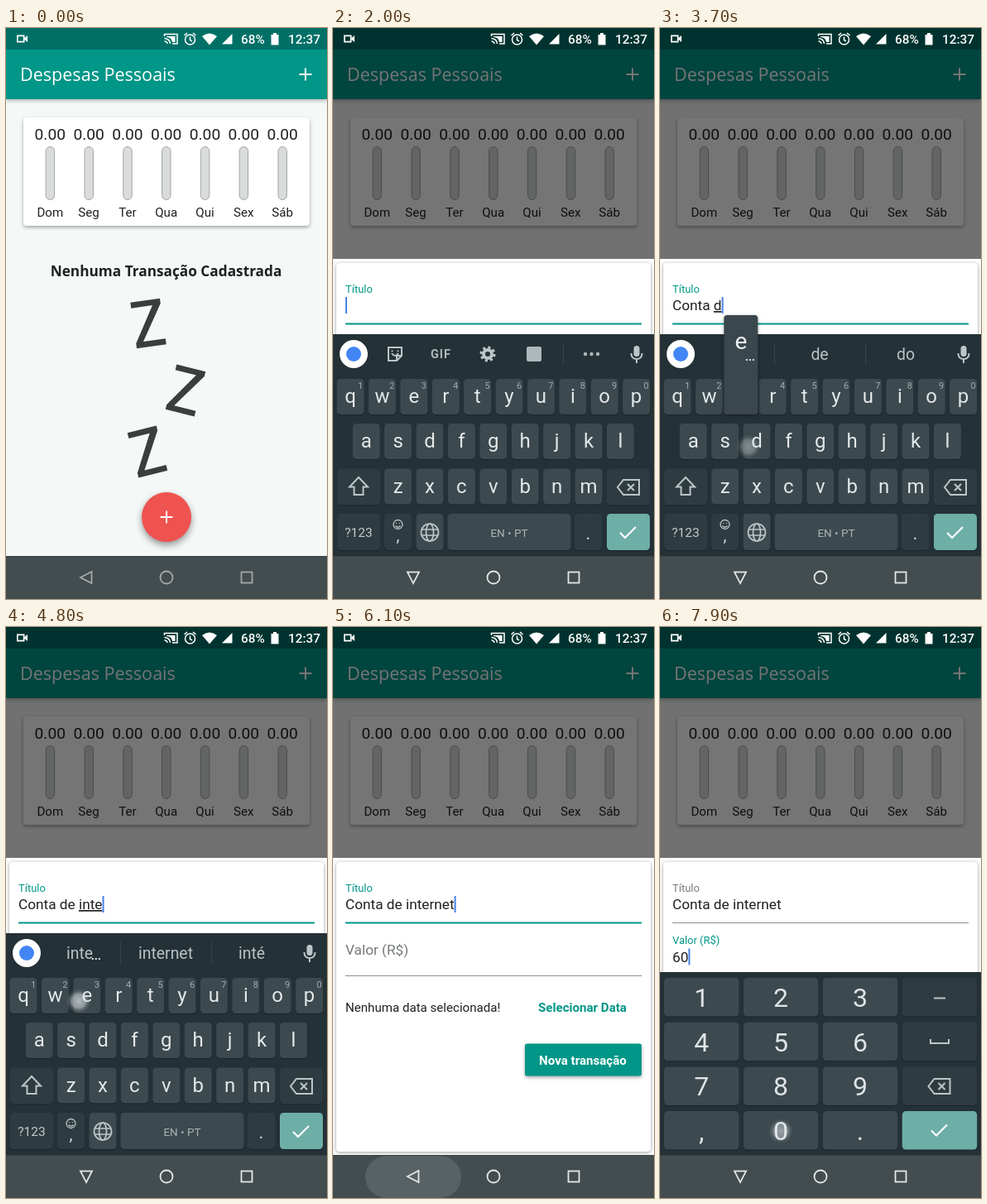
An HTML page that plays this animation: 388 px wide and 690 px high, repeating every 8000 ms.

```html
<!DOCTYPE html>
<html lang="pt-BR">
<head>
<meta charset="utf-8">
<title>Despesas Pessoais</title>
<style>
html, body { margin: 0; width: 100%; height: 100%; overflow: hidden; background: #f4f8f6; }
svg { display: block; width: 100%; height: 100%; }
text { font-family: Roboto, sans-serif; white-space: pre; }
.open { font-family: "Open Sans", sans-serif; }
.mid { text-anchor: middle; }
.bold { font-weight: 700; }
.lift { filter: drop-shadow(0 2px 2px #0005); }
.line { fill: none; stroke-width: 2; stroke: #bcc6c9; }

#scrim, #sheet, #titleLabel, #valueLabel, #titleBar, #valueBar, #letters, #digits, #back, #navGlow, #fabGlow {
  animation: 8s linear infinite;
}
#scrim { animation-name: dim; }
#sheet { animation-name: rise; }
#titleLabel { animation-name: titleFloat; }
#valueLabel { animation-name: valueFloat; }
#titleBar { animation-name: titleFocus; }
#valueBar { animation-name: valueFocus; }
#letters { animation-name: letters; }
#digits { animation-name: digits; }
#back { animation-name: back; transform-origin: 97px 664px; }
#navGlow { animation-name: navGlow; transform-origin: 97px 664px; }
#fabGlow { animation-name: fabGlow; transform-origin: 194px 591px; }

@keyframes dim { 0%, 9.81% { opacity: 0 } 12.94%, 100% { opacity: .54 } }
@keyframes rise {
  0% { transform: translateY(362px) }
  9.81% { transform: translateY(362px); animation-timing-function: cubic-bezier(0, 0, .2, 1) }
  12.94%, 100% { transform: none }
}
@keyframes titleFloat {
  0%, 17.5% { transform: translate(15px, 331px) scale(1); fill: #757b79 }
  20%, 83.75% { transform: translate(15px, 319.5px) scale(.75); fill: #009688 }
  86.25%, 100% { transform: translate(15px, 319.5px) scale(.75); fill: #757b79 }
}
@keyframes valueFloat {
  0%, 83.75% { transform: translate(15px, 395.5px) scale(1); fill: #757b79 }
  86.25%, 100% { transform: translate(15px, 383px) scale(.75); fill: #009688 }
}
@keyframes titleFocus { 0%, 17.5% { opacity: 0 } 20%, 83.75% { opacity: 1 } 86.25%, 100% { opacity: 0 } }
@keyframes valueFocus { 0%, 83.75% { opacity: 0 } 86.25%, 100% { opacity: 1 } }
@keyframes letters {
  0% { transform: translateY(272px) }
  20.63% { transform: translateY(272px); animation-timing-function: cubic-bezier(0, 0, .2, 1) }
  23.75% { transform: none }
  73.5% { transform: none; animation-timing-function: cubic-bezier(.4, 0, 1, 1) }
  76%, 100% { transform: translateY(272px) }
}
@keyframes digits {
  0% { transform: translateY(225px) }
  85% { transform: translateY(225px); animation-timing-function: cubic-bezier(0, 0, .2, 1) }
  88.13%, 100% { transform: none }
}
@keyframes back {
  0%, 20.63% { transform: rotate(0deg) }
  23.13%, 73.5% { transform: rotate(-90deg) }
  75.5%, 85% { transform: rotate(0deg) }
  87.5%, 100% { transform: rotate(-90deg) }
}
@keyframes navGlow {
  0%, 72.5% { opacity: 0; transform: scaleX(.3) }
  74.5%, 76.9% { opacity: 1; transform: none }
  79.4%, 100% { opacity: 0; transform: none }
}
@keyframes fabGlow {
  0%, 5% { opacity: 0; transform: scale(.3) }
  8% { opacity: .25; transform: none }
  11%, 100% { opacity: 0; transform: none }
}
</style>
</head>
<body>
<svg viewBox="0 0 388 690">
  <defs>
    <radialGradient id="glow">
      <stop offset="0" stop-color="#fff" stop-opacity=".8"/>
      <stop offset=".55" stop-color="#e4eaec" stop-opacity=".65"/>
      <stop offset=".75" stop-color="#dfe6e8" stop-opacity=".22"/>
      <stop offset="1" stop-color="#dfe6e8" stop-opacity="0"/>
    </radialGradient>
    <path id="zed" fill="#3b3e3d" d="M-18-28H18V-22L-9 21H18V28H-18V22L8-21H-18Z"/>
    <path id="erase" class="line" d="M-6-9H13V9H-6L-13 0ZM-1-4 7 4M7-4-1 4"/>
    <path id="tick" d="M-10 0-4 6 9-7" fill="none" stroke="#fff" stroke-width="2.2"/>
  </defs>

  <rect width="388" height="690" fill="#f4f8f6"/>
  <rect y="20" width="388" height="66" fill="#009688" style="filter:drop-shadow(0 2px 2px #0004)"/>
  <rect width="388" height="26" fill="#007066"/>
  <text class="open" x="17" y="64" font-size="21.56" fill="#fff">Despesas Pessoais</text>
  <path d="M354.5 56H369.5M362 48.500V63.500" stroke="#fff" stroke-width="2"/>
  <rect class="lift" x="21" y="108" width="346" height="131" rx="4" fill="#fff"/>
  <g id="week"></g>
  <text class="open bold mid" x="193.500" y="300" font-size="17.24" fill="#1e2120">Nenhuma Transação Cadastrada</text>
  <use href="#zed" transform="translate(172 357) rotate(-8)"/>
  <use href="#zed" transform="translate(217 438) rotate(14)"/>
  <use href="#zed" transform="translate(171 512) rotate(-14)"/>
  <circle cx="194" cy="591" r="30" fill="#ef5350" style="filter:drop-shadow(0 4px 4px #0006)"/>
  <circle id="fabGlow" cx="194" cy="591" r="30" fill="#fff"/>
  <path d="M186.500 591H201.500M194 583.500V598.500" stroke="#fff" stroke-width="2"/>

  <rect id="scrim" width="388" height="690"/>

  <g id="sheet">
    <rect y="279" width="388" height="420" fill="#fdfefd"/>
    <rect x="4" y="284" width="380" height="350" rx="4" fill="#fff" style="filter:drop-shadow(0 1px 2px #0006)"/>
    <text id="titleLabel" font-size="17.24">Título</text>
    <rect x="15" y="357" width="358" height="1" fill="#8a8f8d"/>
    <rect id="titleBar" x="15" y="356.500" width="358" height="2" fill="#009688"/>
    <text id="valueLabel" font-size="17.24">Valor (R$)</text>
    <rect x="15" y="421" width="358" height="1" fill="#8a8f8d"/>
    <rect id="valueBar" x="15" y="420.500" width="358" height="2" fill="#009688"/>
    <text id="titleText" x="15" y="341" font-size="17.24" fill="#1e2120"><tspan></tspan><tspan text-decoration="underline"></tspan></text>
    <text id="valueText" x="15" y="404.500" font-size="17.24" fill="#1e2120"></text>
    <rect id="caret" width="2" height="20" fill="#4a80e8"/>
    <text x="15" y="465" font-size="15.1" fill="#1e2120">Nenhuma data selecionada!</text>
    <text class="bold mid" x="301.500" y="465" font-size="15.1" fill="#009688">Selecionar Data</text>
    <rect class="lift" x="232" y="503.500" width="141" height="39" rx="2.500" fill="#009688"/>
    <text class="bold mid" x="302" y="528.500" font-size="15.1" fill="#fff">Nova transação</text>
  </g>

  <g id="letters">
    <rect y="370" width="388" height="270" fill="#243136"/>
    <circle cx="25" cy="394" r="17" fill="#fff"/>
    <circle cx="25" cy="394" r="9" fill="#4285f4"/>
    <g id="tools" fill="#aeb8bb">
      <path class="line" d="M67 386H83V396L77 402H67ZM77 402V396H83"/>
      <path class="line" d="M71 393Q75 399 79 393M71.500 389.500V391M78.500 389.500V391" stroke-width="1.500"/>
      <text class="bold mid" x="130.500" y="399" font-size="14.500" letter-spacing="1">GIF</text>
      <circle class="line" cx="187" cy="394" r="5" stroke-width="4" style="stroke-width:4"/>
      <circle class="line" cx="187" cy="394" r="8" stroke-dasharray="3.140 3.140" style="stroke-width:3"/>
      <rect x="234" y="385" width="18" height="18" rx="2"/>
      <path d="M278.500 381V407" stroke="#38464c"/>
      <circle cx="305" cy="394" r="2.200"/><circle cx="312.500" cy="394" r="2.200"/><circle cx="320" cy="394" r="2.200"/>
    </g>
    <g id="hints" font-size="19.4" fill="#b9c2c5" class="mid">
      <path d="M138.500 381V407M248.500 381V407" stroke="#38464c"/>
      <text x="89" y="401"></text><text x="193" y="401"></text><text x="297" y="401"></text>
    </g>
    <rect x="363.500" y="384" width="7" height="13" rx="3.500" fill="#bcc6c9"/>
    <path class="line" d="M360.500 393V394Q361 400 367 400T373.500 394V393M367 400V405" stroke-width="1.600"/>
    <g id="letterKeys"></g>
    <path class="line" d="M31 543 42 554.500H36.500V564H25.500V554.500H20Z"/>
    <use href="#erase" x="357" y="555"/>
    <text class="mid" x="31" y="615" font-size="15.500" fill="#c3cbcd">?123</text>
    <circle class="line" cx="78.500" cy="600" r="5.500" style="stroke-width:1.300"/>
    <path class="line" d="M75.500 601.500Q78.500 605 81.500 601.500M76.500 598V599M80.500 598V599" style="stroke-width:1.300"/>
    <text class="mid" x="78.500" y="620" font-size="20" fill="#d5dbdd">,</text>
    <g class="line" style="stroke-width:1.700">
      <circle cx="117" cy="609.500" r="10.500"/><ellipse cx="117" cy="609.500" rx="4.500" ry="10.500"/>
      <path d="M107.500 606H126.500M107.500 613H126.500"/>
    </g>
    <text class="mid" x="213" y="614.500" font-size="13.500" fill="#aab4b7">EN • PT</text>
    <text class="mid" x="308.500" y="618" font-size="22" fill="#d5dbdd">.</text>
    <use href="#tick" x="357" y="610"/>
  </g>
  <g id="popup">
    <rect x="-20.500" y="-77" width="41" height="120" rx="4" fill="#3a474d" style="filter:drop-shadow(0 1px 2px #0005)"/>
    <text class="mid" y="-36" font-size="28" fill="#eef1f2"></text>
    <path d="M6-23H16" stroke="#dfe4e6" stroke-width="2" stroke-dasharray="2 2"/>
  </g>

  <g id="digits">
    <rect y="417" width="388" height="225" fill="#243136"/>
    <g id="digitKeys"></g>
    <path class="line" d="M331 448.500H345M327 498V503H349V498"/>
    <use href="#erase" x="337.500" y="555"/>
    <use href="#tick" x="338" y="608.500"/>
  </g>

  <rect y="638" width="388" height="52" fill="#434c4e"/>
  <rect y="638" width="388" height="1" fill="#394143"/>
  <rect id="navGlow" x="39" y="639" width="116" height="51" rx="25.500" fill="#586163"/>
  <g id="nav" fill="none" stroke-width="1.800">
    <path id="back" d="M90 664 103.500 657V671Z"/>
    <circle cx="194" cy="664" r="7.500"/>
    <rect x="284.500" y="657.500" width="13" height="13"/>
  </g>

  <g fill="#fff">
    <path d="M13 8.500H22.500V12L26 9V17L22.500 14V17.500H13ZM14.700 10.200V15.800H20.800V10.200Z" fill-rule="evenodd"/>
    <g fill="none" stroke="#fff" stroke-width="1.500">
      <path d="M191.500 10V7.500H207V19H201M191.500 12.500Q198 13 198.500 19M191.500 16Q194.500 16 195 19"/>
      <circle cx="222.500" cy="14" r="6"/><path d="M222.500 10.500V14.500L225 16M215.500 9 219 6.200M229.500 9 226 6.200"/>
    </g>
    <path d="M194 10H204.500V17H201Q200 11 194 11Z"/>
    <path d="M237 10Q246 3 255 10L246 20.500Z"/>
    <path d="M261 19.500 273.500 7V19.500Z"/>
    <path d="M320.500 8H323V6H327V8H329.500V20.500H320.500Z"/>
    <text x="284" y="18.500" font-size="15.300" font-weight="500">68%</text>
    <text x="341" y="18.500" font-size="15.400" font-weight="500">12:37</text>
  </g>
  <circle id="dot" r="15" fill="url(#glow)"/>
</svg>
<script>
const LOOP = 8000;
const $ = id => document.getElementById(id);

function add(parent, tag, attrs, text) {
  const node = document.createElementNS('http://www.w3.org/2000/svg', tag);
  for (const name in attrs) node.setAttribute(name, attrs[name]);
  if (text) node.textContent = text;
  parent.appendChild(node);
  return node;
}

'Dom Seg Ter Qua Qui Sex Sáb'.split(' ').forEach((day, i) => {
  const x = 53.3 + 46.8 * i, week = $('week');
  add(week, 'text', { class: 'mid', x, y: 134.5, 'font-size': 19.2, fill: '#1e2120' }, '0.00');
  add(week, 'rect', { x: x - 5.1, y: 143.5, width: 10.4, height: 64, rx: 5.2, fill: '#d9dcdb', stroke: '#a2a5a4' });
  add(week, 'text', { class: 'mid', x, y: 227.5, 'font-size': 15.1, fill: '#1e2120' }, day);
});

function cap(parent, x, y, width, height, fill) {
  add(parent, 'rect', { x, y: y + 1, width, height, rx: 4.5, fill: '#192428' });
  add(parent, 'rect', { x, y, width, height, rx: 4.5, fill });
}

// Letter keyboard
const PLAIN = '#3c494e', DARK = '#2e3b40', TEAL = '#6daea6';
const keys = {};
[['qwertyuiop', 21, 424], ['asdfghjkl', 40.2, 478], ['zxcvbnm', 78.6, 532.5]].forEach(([row, left, y], r) => {
  [...row].forEach((char, i) => {
    const x = left + 38.4 * i, box = $('letterKeys');
    cap(box, x - 16.5, y, 33, 43, PLAIN);
    const label = add(box, 'text', { class: 'mid', x, y: y + 29, 'font-size': 24, fill: '#e3e8e9' }, char);
    if (!r) add(box, 'text', { class: 'mid', x: x + 12, y: y + 12, 'font-size': 11, fill: '#a3adb0' }, String((i + 1) % 10));
    keys[char] = { x, y, label };
  });
});
[[5, 532.5, 52, DARK], [331, 532.5, 52, DARK], [5, 587, 52, DARK], [62, 587, 33, DARK], [100.5, 587, 33, PLAIN],
 [138.5, 587, 149, PLAIN], [292, 587, 33, DARK], [331, 587, 52, TEAL]]
  .forEach(([x, y, w, fill]) => cap($('letterKeys'), x, y, w, 44, fill));

// Number keyboard
[...'123-456 789<,0.!'].forEach((char, i) => {
  const col = i % 4, x = 5 + 95.9 * col, y = 424 + 53.7 * (i >> 2);
  cap($('digitKeys'), x, y, 90.5, 46.5, col < 3 ? PLAIN : i < 15 ? DARK : TEAL);
  if (col < 3) add($('digitKeys'), 'text', { class: 'mid', x: x + 45.2, y: y + 35, 'font-size': 32, fill: '#dfe4e6' }, char);
});

// Touches: x, y, down, up
const touches = [[194, 591, 420, 640], [130, 330, 1330, 1430], [31, 556, 2180, 2270],
  [97, 664, 5800, 5890], [150, 392, 6600, 6700], [242, 501, 7420, 7510], [146, 609, 7770, 7850]];

const downs = [2430, 2640, 2840, 3040, 3240, 3400, 3520, 3650, 3940, 4130, 4320, 4490, 4660, 4930, 5130, 5330, 5530];
const strokes = [...'Conta de internet'].map((char, i) => {
  const key = keys[char.toLowerCase()], down = downs[i], up = down + 110;
  touches.push(key ? [key.x - 10, key.y + 28, down, up] : [205, 612, down, up]);
  return { char, key, down, up };
});

const guesses = {
  C: 'C Com Como', Co: 'Co Com Como', Con: 'Con Conta Consegui', Cont: 'Cont Conta Contato',
  Conta: 'Conta Contas Contato', d: 'd de do', de: 'de dele dela', i: 'i isso ir', in: 'in início inteiro',
  int: 'int inteiro interior', inte: 'inte internet inté', inter: 'inter internet interior',
  intern: 'intern internet interno', interne: 'interne internet internei', internet: 'internet internets internett'
};

const [fixed, composing] = $('titleText').children;
const hintTexts = $('hints').querySelectorAll('text');
const show = (node, on) => { node.style.visibility = on ? 'visible' : 'hidden'; };
const setText = (node, text) => { if (node.textContent !== text) node.textContent = text; };

function render(t) {
  const typed = strokes.filter(s => s.up <= t).map(s => s.char).join('');
  const cut = t < 5850 ? typed.lastIndexOf(' ') + 1 : typed.length;
  const word = typed.slice(typed.lastIndexOf(' ') + 1);
  setText(fixed, typed.slice(0, cut));
  setText(composing, typed.slice(cut));
  const amount = t < 7510 ? '' : t < 7850 ? '6' : '60';
  setText($('valueText'), amount);

  const onValue = t >= 6700;
  const field = onValue ? $('valueText') : $('titleText');
  const filled = onValue ? amount : typed;
  $('caret').setAttribute('x', 15 + (filled ? field.getComputedTextLength() : 0));
  $('caret').setAttribute('y', onValue ? 388.5 : 325);
  show($('caret'), t >= 1500);

  show($('tools'), !typed);
  show($('hints'), typed);
  const list = (guesses[word] || (typed === 'Conta ' ? 'de do da' : 'luz água casa')).split(' ');
  hintTexts.forEach((node, i) => setText(node, list[i]));

  const upper = t >= 2270 && t < 2540;
  for (const char in keys) setText(keys[char].label, upper ? char.toUpperCase() : char);

  const held = strokes.find(s => s.key && t >= s.down && t < s.up);
  show($('popup'), held);
  if (held) {
    $('popup').setAttribute('transform', `translate(${held.key.x} ${held.key.y})`);
    setText($('popup').children[1], held.char);
    show($('popup').children[2], 'aeiocn'.includes(held.char.toLowerCase()));
  }

  const touch = touches.find(([, , down, up]) => t >= down && t < up + 100);
  show($('dot'), touch);
  if (touch) {
    const [x, y, , up] = touch;
    $('dot').setAttribute('transform', `translate(${x} ${y})`);
    $('dot').style.opacity = t < up ? 1 : 1 - (t - up) / 130;
  }
  $('nav').setAttribute('stroke', t < 1700 ? '#a3a9aa' : '#e3e7e8');
}

let start;
function tick(now) {
  start ??= now;
  render((now - start) % LOOP);
  requestAnimationFrame(tick);
}
render(0);
requestAnimationFrame(tick);
</script>
</body>
</html>
```
